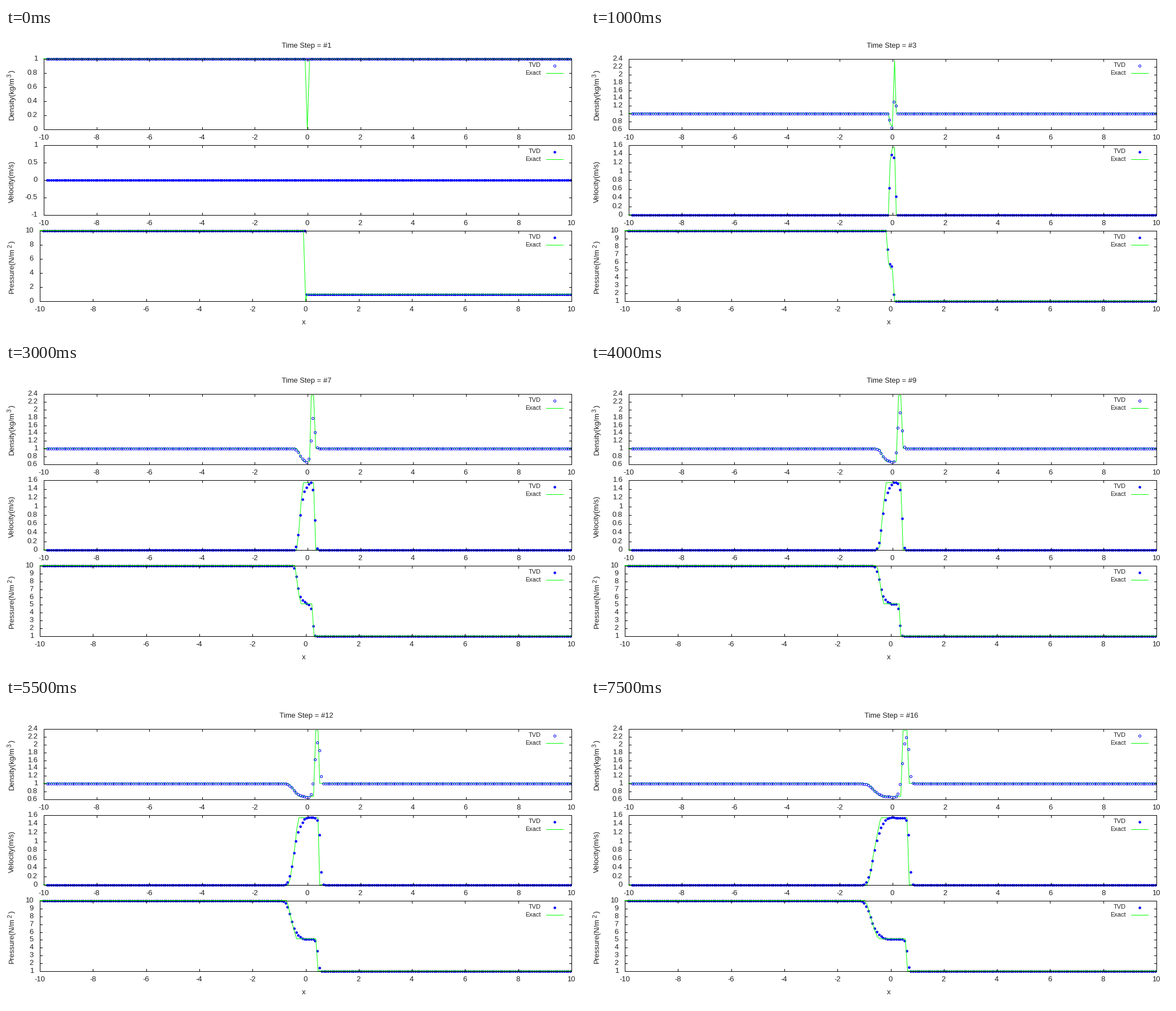
Recreate the animation shown at these times as a matplotlib script. Size 1027 by 545 pixels, loop 8 s.

```python
import math

import numpy as np
import matplotlib.pyplot as plt
from matplotlib.animation import FuncAnimation

W, H, DPI = 1027, 545, 100
PX = 72 / DPI
BLUE, GREEN, INK = "#0000ff", "#00ff00", "#202020"
GAMMA, DX, CFL, DELTA, STEPS = 5 / 3, 0.08, 0.95, 0.2, 16
P_LEFT, P_RIGHT = 10.0, 1.0
C_LEFT = math.sqrt(GAMMA * P_LEFT)

cells = -9.96 + DX * np.arange(250)
nodes = DX * np.arange(-125, 126)


# Second-order upwind TVD solver
def primitives(state):
    rho = state[0]
    u = state[1] / rho
    p = (GAMMA - 1) * (state[2] - 0.5 * rho * u**2)
    return rho, u, p


def minmod(a, b):
    return np.where(a * b > 0, np.sign(a) * np.minimum(abs(a), abs(b)), 0)


def entropy_fix(z):
    return np.where(abs(z) < DELTA, (z**2 + DELTA**2) / (2 * DELTA), abs(z))


def advance(state):
    rho, u, p = primitives(state)
    dt = CFL * DX / np.max(abs(u) + np.sqrt(GAMMA * p / rho))
    ratio = dt / DX

    padded = np.pad(state, ((0, 0), (2, 2)), mode="edge")
    rho, u, p = primitives(padded)
    enthalpy = (padded[2] + p) / rho
    flux = np.array([rho * u, rho * u**2 + p, rho * u * enthalpy])

    root = np.sqrt(rho)
    total = root[:-1] + root[1:]
    um = (root[:-1] * u[:-1] + root[1:] * u[1:]) / total
    hm = (root[:-1] * enthalpy[:-1] + root[1:] * enthalpy[1:]) / total
    rm = root[:-1] * root[1:]
    c = np.sqrt((GAMMA - 1) * (hm - um**2 / 2))
    dr, du, dp = np.diff(rho), np.diff(u), np.diff(p)

    speed = np.array([um - c, um, um + c])
    alpha = np.array([(dp - rm * c * du) / (2 * c**2),
                      dr - dp / c**2,
                      (dp + rm * c * du) / (2 * c**2)])
    vectors = np.array([np.ones((3, um.size)), speed,
                        [hm - um * c, um**2 / 2, hm + um * c]])

    g = minmod(alpha[:, :-1], alpha[:, 1:])
    g_left, g_right = g[:, :-1], g[:, 1:]
    speed, alpha, vectors = speed[:, 1:-1], alpha[:, 1:-1], vectors[:, :, 1:-1]
    sigma = 0.5 * (entropy_fix(speed) - ratio * speed**2)
    solid = abs(alpha) > 1e-12
    shift = np.where(solid, sigma * (g_right - g_left) / np.where(solid, alpha, 1), 0)
    phi = sigma * (g_left + g_right) - entropy_fix(speed + shift) * alpha
    face = 0.5 * (flux[:, 1:-2] + flux[:, 2:-1] + (vectors * phi).sum(axis=1))
    return state - ratio * np.diff(face, axis=1), dt


# Exact Riemann solution
def shock_velocity(p):
    a, b = 2 / (GAMMA + 1), (GAMMA - 1) / (GAMMA + 1) * P_RIGHT
    return (p - P_RIGHT) * math.sqrt(a / (p + b))


def fan_velocity(p):
    power = (GAMMA - 1) / (2 * GAMMA)
    return 2 * C_LEFT / (GAMMA - 1) * (1 - (p / P_LEFT) ** power)


def star_pressure():
    low, high = P_RIGHT, P_LEFT
    for _ in range(60):
        mid = (low + high) / 2
        if shock_velocity(mid) < fan_velocity(mid):
            low = mid
        else:
            high = mid
    return low


P_STAR = star_pressure()
U_STAR = shock_velocity(P_STAR)
K = (GAMMA - 1) / (GAMMA + 1)
RHO_STAR = (P_STAR / P_RIGHT + K) / (K * P_STAR / P_RIGHT + 1)
SHOCK = U_STAR * RHO_STAR / (RHO_STAR - 1)


def exact(t):
    if t == 0:
        rho = np.where(abs(nodes) < DX / 2, 0.0, 1.0)
        p = np.where(nodes < 0, P_LEFT, P_RIGHT) * rho
        return rho, np.zeros_like(nodes), p
    xi = nodes / t
    u = np.clip(2 / (GAMMA + 1) * (C_LEFT + xi), 0, U_STAR)
    c = (C_LEFT - (GAMMA - 1) / 2 * u) / C_LEFT
    rho, p = c ** (2 / (GAMMA - 1)), P_LEFT * c ** (2 * GAMMA / (GAMMA - 1))
    rho = np.where(xi > U_STAR, RHO_STAR, rho)
    ahead = xi > SHOCK
    return (np.where(ahead, 1, rho), np.where(ahead, 0, u),
            np.where(ahead, P_RIGHT, p))


def simulate():
    pressure = np.where(cells < 0, P_LEFT, P_RIGHT)
    state = np.array([np.ones_like(cells), np.zeros_like(cells),
                      pressure / (GAMMA - 1)])
    t, history = 0.0, []
    for _ in range(STEPS):
        history.append((primitives(state), exact(t)))
        state, dt = advance(state)
        t += dt
    return history


history = simulate()

# Drawing, in pixel coordinates with y pointing down
plt.rcParams["font.family"] = "Liberation Sans"
fig = plt.figure(figsize=(W / DPI, H / DPI), dpi=DPI, facecolor="white")
ax = fig.add_axes([0, 0, 1, 1])

RIGHT = 1002
# left, top, bottom, hollow markers, line above markers
PANELS = [(66, 54, 179, True, False),
          (66, 207, 331, False, False),
          (59, 359, 484, False, True)]


def snap(v):
    """Centre of the nearest pixel."""
    return np.floor(np.asarray(v, float) + 0.5) + 0.5


def text(x, y, s, size=13, ha="center", rotation=0):
    ax.text(x, y, s, fontsize=size * PX, ha=ha, va="baseline", color=INK,
            rotation=rotation, rotation_mode="anchor")


def line(x, y, color="black", z=5):
    ax.plot(snap(x), snap(y), color=color, lw=PX, zorder=z,
            solid_capstyle="projecting", solid_joinstyle="round")


def dots(x, y, hollow):
    ax.plot(snap(x), snap(y), "o", zorder=3, ms=(4 if hollow else 4.6) * PX,
            mew=PX if hollow else 0, mec=BLUE, mfc="none" if hollow else BLUE)


def axis_range(values):
    low, high = values.min(), values.max()
    if high - low < 1e-9:
        low, high = -1.0, 1.0
    power = 10 ** math.floor(math.log10(high - low) + 1e-9)
    room = 20 / ((high - low) / power) - 1e-6
    tic = next(s for limit, s in
               ((20, 0.1), (10, 0.2), (4, 0.5), (1, 1), (0, 2)) if room > limit)
    tic *= power
    return math.floor(low / tic + 0.08), math.ceil(high / tic - 0.08), tic


def draw_panel(panel, numeric, reference):
    left, top, bottom, hollow, line_above = panel
    first, last, tic = axis_range(np.concatenate([numeric, reference]))

    def to_x(x):
        return left + (x + 10) / 20 * (RIGHT - left)

    def to_y(v):
        return bottom - (v / tic - first) / (last - first) * (bottom - top)

    line(to_x(nodes), to_y(reference), GREEN, 4 if line_above else 2)
    dots(to_x(cells[1:]), to_y(numeric[1:]), hollow)

    line([left, RIGHT, RIGHT, left, left], [top, top, bottom, bottom, top])
    for x in range(-10, 11, 2):
        px = to_x(x)
        line([px, px], [bottom, bottom - 4])
        line([px, px], [top, top + 4])
        text(px + 0.5, bottom + 19, str(x))
    for n in range(first, last + 1):
        py = to_y(n * tic)
        line([left, left + 4], [py, py])
        line([RIGHT, RIGHT - 4], [py, py])
        text(left - 10, py + 4, f"{round(n * tic, 6):g}", ha="right")

    text(949, top + 15, "TVD", 11, "right")
    text(949, top + 29, "Exact", 11, "right")
    dots([972], [top + 12], hollow)
    line([957, 987], [top + 25, top + 25], GREEN)


def side_label(y, name, power=None, power_y=0, close_y=0):
    text(14, y, name, ha="left", rotation=90)
    if power:
        text(10, power_y, power, 10.4, "left", 90)
        text(14, close_y, ")", ha="left", rotation=90)


def draw(step):
    ax.clear()
    ax.set(xlim=(0, W), ylim=(H, 0))
    ax.axis("off")
    text(533, 35, f"Time Step = #{step + 1}")
    for panel, numeric, reference in zip(PANELS, *history[step]):
        draw_panel(panel, numeric, reference)
    side_label(163, "Density(kg/m", "3", 87, 79)
    side_label(310, "Velocity(m/s)")
    side_label(471, "Pressure(N/m", "2", 390, 382)
    text(528.5, 526, "x")
    return []


anim = FuncAnimation(fig, draw, frames=STEPS, interval=500, repeat=True,
                     repeat_delay=0, init_func=lambda: [], blit=False)
plt.show()
```
